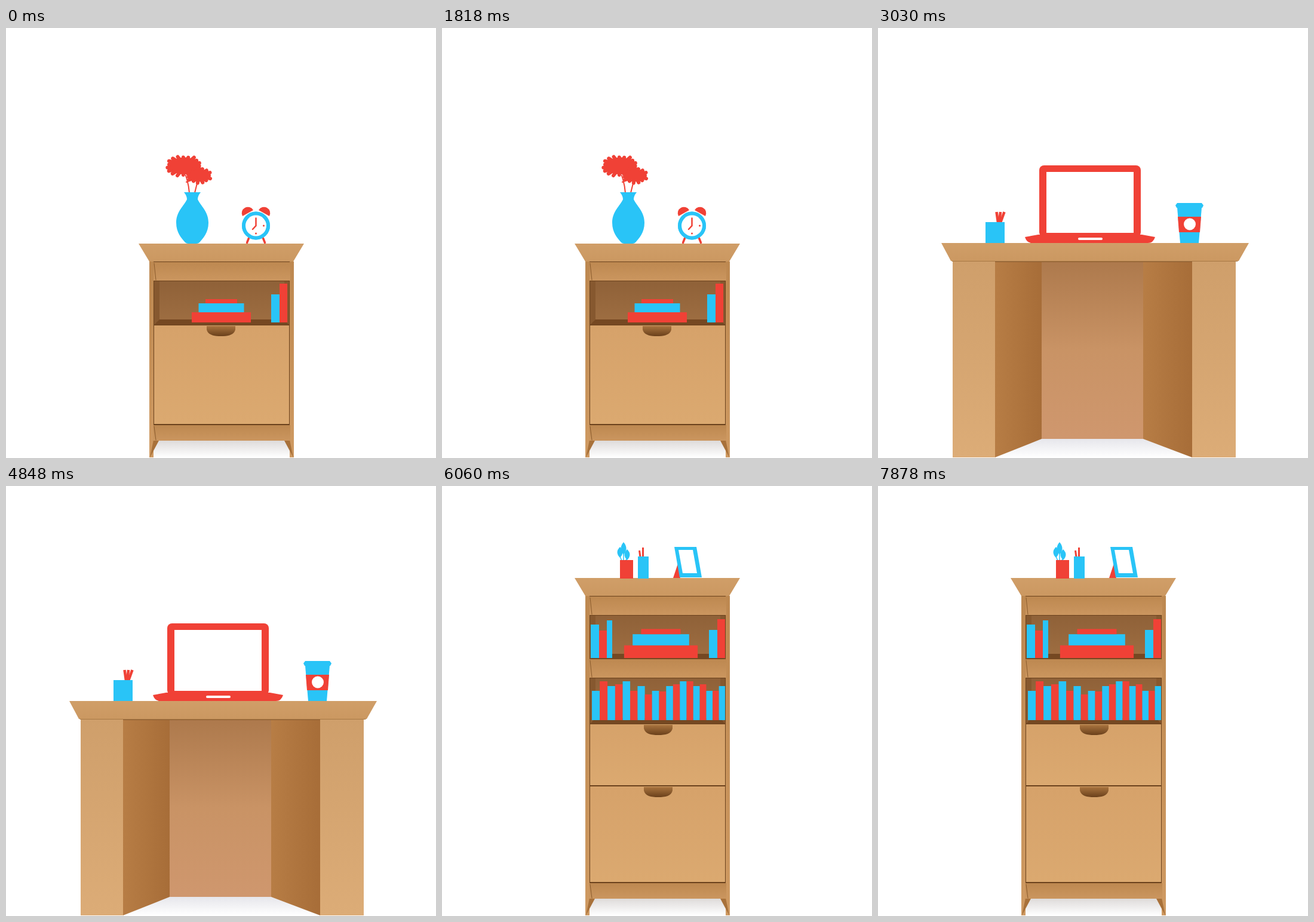
Recreate the animation shown at these times as an HTML page. Size 720 px wide and 720 px high, loop 9090 ms.

```html
<!DOCTYPE html>
<html lang="en">
<head>
<meta charset="utf-8">
<title>Cardboard furniture</title>
<style>
  html, body { margin: 0; width: 100%; height: 100%; overflow: hidden; background: #fff; }
  svg { display: block; width: 100vw; height: 100vh; }
</style>
</head>
<body>
<svg id="stage" viewBox="0 0 720 720"></svg>
<script>
const RED = '#f04136', BLUE = '#29c4f7', WHITE = '#fff', GAP = '#6b421d';
const LOOP = 9090;

const poly = (fill, points) => `<polygon fill="${fill}" points="${points}"/>`;
const path = (fill, d) => `<path fill="${fill}" d="${d}"/>`;
const line = (color, width, d, cap = 'round') =>
  `<path fill="none" stroke="${color}" stroke-width="${width}" stroke-linecap="${cap}" d="${d}"/>`;
const dot = (fill, x, y, r) => `<circle fill="${fill}" cx="${x}" cy="${y}" r="${r}"/>`;
// Rectangle given by its left, top, right and bottom edges
const box = (fill, x1, y1, x2, y2, r = 0) =>
  `<rect fill="${fill}" x="${x1}" y="${y1}" width="${x2 - x1}" height="${y2 - y1}" rx="${r}"/>`;
const mirror = (axis, shapes) =>
  shapes + `<g transform="matrix(-1 0 0 1 ${2 * axis} 0)">${shapes}</g>`;
const repeat = (count, draw) => Array.from({ length: count }, (_, i) => draw(i)).join('');

// Gradients run top to bottom, or left to right when across is set
const gradient = (id, colors, across) =>
  `<linearGradient id="${id}" x2="${across ? 1 : 0}" y2="${across ? 0 : 1}">` +
  colors.map((c, i) => `<stop offset="${i / (colors.length - 1)}" stop-color="${c}"/>`).join('') +
  '</linearGradient>';

const defs = `<defs>
  ${gradient('top', ['#d09e68', '#cb9861'])}
  ${gradient('rail', ['#bd8850', '#cb965f'])}
  ${gradient('door', ['#d6a26a', '#dba970'])}
  ${gradient('side', ['#bd8850', '#cf9a62'])}
  ${gradient('back', ['#8f6138', '#9d6d41'])}
  ${gradient('notch', ['#a9743f', '#6a401b'])}
  ${gradient('shade', ['#dedbda', '#fff'])}
  ${gradient('leg', ['#cf9f6b', '#dcac77'])}
  ${gradient('inner', ['#b77d45', '#a76d38'], true)}
  ${gradient('panel', ['#ad794c', '#c99365', '#cf976e'])}
  ${gradient('floor', ['#e6e6eb', '#fff'])}
</defs>`;

const shelf = (top, bottom) =>
  box('#86582f', 248, top, 474, bottom) +
  box('url(#back)', 257, top, 466, bottom - 9) +
  poly('#754822', `248,${bottom} 257,${bottom - 9} 466,${bottom - 9} 474,${bottom}`) +
  box(GAP, 248, top, 474, top + 1);

const rail = (top, bottom) =>
  box('url(#rail)', 247, top, 476, bottom) +
  line('#8a5b2c', 1, `M248 ${top + 2}L251 ${bottom - 1}`);

const drawer = (top, bottom, notchX) =>
  box('url(#door)', 248, top, 474, bottom) +
  path('url(#notch)', `M${notchX} ${top + 1}h48v6c-2 9 -12 11 -24 11s-22 -2 -24 -11z`);

// Shared body of the two cabinets, with its table top at the given height
const cabinet = (y) =>
  poly('url(#shade)', '256,691 466,691 481,719 241,719') +
  box(GAP, 247, y + 30, 475, 691) +
  mirror(361,
    poly('url(#side)', `240,${y + 30} 247,${y + 30} 247,719 240,719`) +
    poly('#a8713a', '247,690 256,691 241,719')) +
  rail(y + 31, y + 62) +
  rail(665, 691) +
  poly('url(#top)', `222,${y} 499,${y} 481,${y + 30} 240,${y + 30}`);

// Petals of seeded length around a flattened centre
function flower(x, y, rx, ry, petals) {
  let seed = petals;
  const random = () => (seed = seed * 16807 % 2147483647) / 2147483647;
  const petal = (i) => {
    const angle = i / petals * 2 * Math.PI, reach = .85 + .2 * random();
    return `M${x} ${y}l${rx * reach * Math.cos(angle)} ${ry * reach * Math.sin(angle)}`;
  };
  return line(RED, 6, repeat(petals, petal)) +
    `<ellipse fill="${RED}" cx="${x}" cy="${y}" rx="${rx * .8}" ry="${ry * .85}"/>`;
}

// Three lying books, each 23 units narrower than the one below
const bookStack = (x, base, scale) =>
  `<g transform="translate(${x} ${base}) scale(${scale})">` +
  box(RED, -49.5, -17, 49.5, 0) + box(BLUE, -38, -32, 38, -17) + box(RED, -26.5, -39, 26.5, -32) +
  '</g>';

const bookPair = (x, base) =>
  box(BLUE, x, base - 47, x + 14, base) + box(RED, x + 14, base - 65, x + 27, base);

// A full row: books get a little thinner to the right, heights follow two waves
function bookRow(base) {
  const edge = (i) => 251 + 13.2 * i - .077 * i * i;
  const height = (i) => i % 2
    ? 54 + 11 * Math.cos((i - 1) * Math.PI / 6)
    : 57 - 8 * Math.cos(i * Math.PI / 4);
  return repeat(19, (i) =>
    box(i % 2 ? RED : BLUE, edge(i), base - Math.round(height(i)), edge(i + 1), base));
}

const leaf = (x, y, h) =>
  path(BLUE, `M${x} ${y}q9 ${h / 2} 0 ${h}q-9 ${-h / 2} 0 ${-h}z`) +
  line(BLUE, 1.5, `M${x} ${y + h - 2}L${(x + 304) / 2} 125`);

const clock = (x, y) =>
  mirror(x,
    path(RED, `M${x - 22.5} ${y - 16}a10 10 0 0 1 18 -10z`) +
    line(RED, 3.5, `M${x - 12} ${y + 21}l-3 7.5`) +
    dot(BLUE, x, y, 23.5) + dot(WHITE, x, y, 17.5) + dot(RED, x - 13, y, 1.5)) +
  dot(RED, x, y + 13, 1.5) +
  line(RED, 2.5, `M${x} ${y - 12.5}v12.5l-5.5 6`);

const vase = () =>
  path(BLUE, 'M298 275H326Q321 281 321 287C326 298 339 307 339 326C339 343 330 352 324 359Q322 361 319 361H305Q302 361 300 359C294 352 285 343 285 326C285 307 298 298 303 287Q303 281 298 275Z');

const nightstand = () =>
  cabinet(361) + shelf(423, 497) + drawer(498, 663, 336) +
  line(RED, 2, 'M301 247Q306 262 307 276M320 260L316 276M312 254L302 258') +
  flower(299, 231, 29, 17, 19) + flower(323, 247, 20, 12, 15) +
  vase() + clock(418.5, 331) +
  bookStack(360.5, 493, 1) + bookPair(444, 493);

const deskSide = (outer, fold, inner) =>
  poly('url(#inner)', `${fold},390 ${inner},390 ${inner},688 ${fold},719`) +
  poly('url(#leg)', `${outer},390 ${fold},390 ${fold},719 ${outer},719`);

const laptop = () =>
  box(RED, 270, 230, 440, 350, 8) + box(WHITE, 282, 241, 428, 343) +
  path(RED, 'M246 350L268 346H442L464 350Q461 360 452 360H258Q249 360 246 350Z') +
  box(WHITE, 335, 351, 376, 355, 2);

const cup = () =>
  poly(BLUE, '501,301 542,301 537,360 506,360') +
  path(BLUE, 'M501 293H542L545 297L543 301H500L498 297Z') +
  poly(RED, '502,316 541,316 539,342 504,342') +
  dot(WHITE, 522, 328.5, 10);

const desk = () =>
  poly('url(#floor)', '274,688 444,688 526,719 196,719') +
  box('url(#panel)', 274, 390, 444, 688) +
  deskSide(125, 196, 274) + deskSide(599, 526, 444) +
  box('#8f5f32', 196, 390, 526, 392) +
  poly('url(#top)', '106,360 621,360 604,390 122,390') +
  line('#a87945', 1, 'M124 390.5H602') +
  laptop() + cup() +
  repeat(3, (i) => line(RED, 4.5, `M${201 + 2 * i} 326L${198.5 + 6.5 * i} 308`, 'butt')) +
  box(BLUE, 180, 325, 212, 360);

const photoFrame = () =>
  poly(RED, '395,130 387,154 399,154') +
  poly(BLUE, '389,102 426,102 435,153 398,153') +
  poly(WHITE, '396,107 420,107 427,146 403,146');

const bookcase = () =>
  cabinet(154) + shelf(216, 290) + rail(290, 321) + shelf(321, 398) +
  drawer(399, 501, 338) + drawer(503, 663, 338) +
  box(BLUE, 249, 232, 263, 288) + box(RED, 263, 242, 276, 288) + box(BLUE, 276, 225, 285, 288) +
  bookStack(366.5, 288, 1.245) + bookPair(447, 288) + bookRow(392) +
  leaf(298, 102, 18) + leaf(304, 94, 21) + leaf(310, 106, 18) +
  line(RED, 3, 'M330.5 108L332 119M336.5 103V119', 'butt') +
  box(RED, 298, 124, 320, 155) + box(BLUE, 328, 118, 346, 155) +
  photoFrame();

const stage = document.getElementById('stage');
stage.innerHTML = defs +
  [nightstand, desk, bookcase].map(draw => `<g class="scene">${draw()}</g>`).join('');
const scenes = stage.querySelectorAll('.scene');
const start = performance.now();

function tick() {
  const time = (performance.now() - start) % LOOP;
  const current = Math.floor(time / LOOP * scenes.length);
  scenes.forEach((scene, i) => { scene.style.display = i === current ? '' : 'none'; });
  requestAnimationFrame(tick);
}
tick();
</script>
</body>
</html>
```
